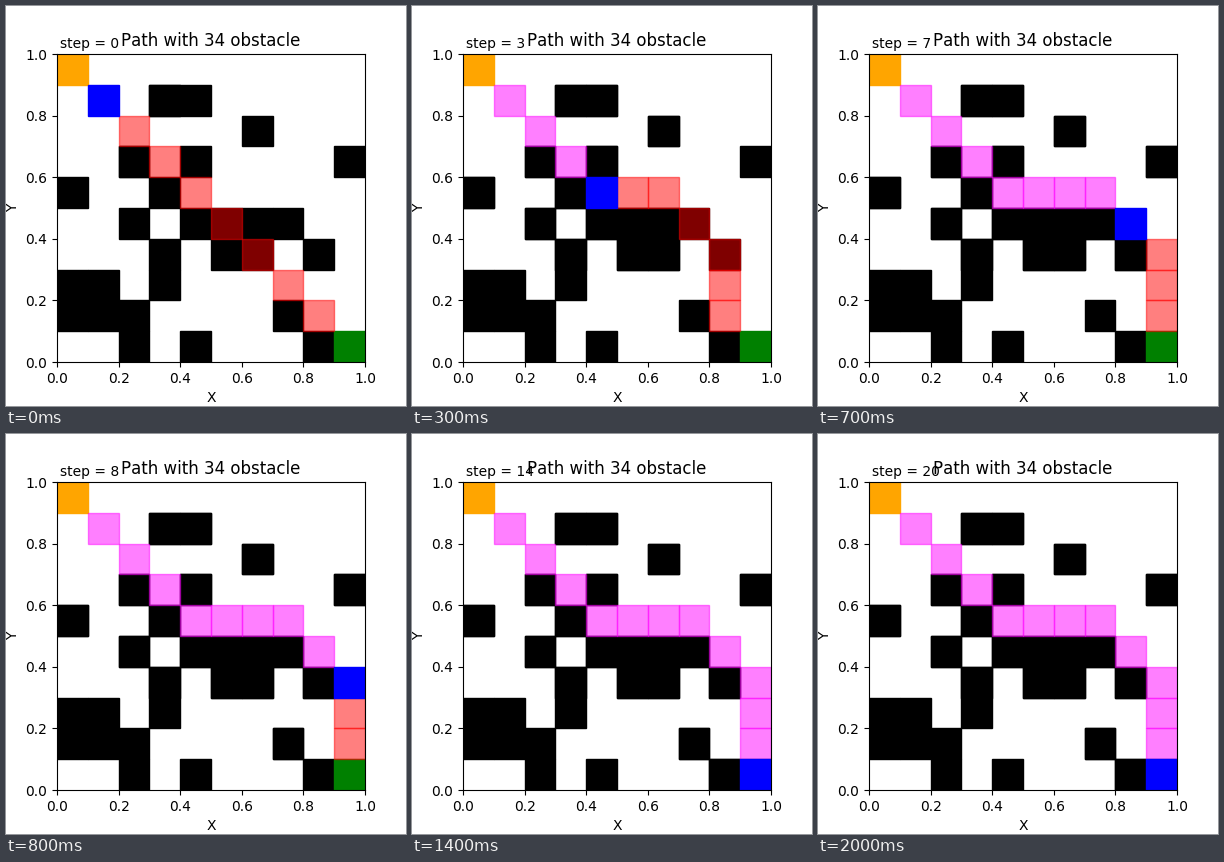
A matplotlib script that plays this animation: 400 by 400 pixels, repeating every 2.1 s.

```python
import math
from itertools import product

import matplotlib.pyplot as plt
from matplotlib.animation import FuncAnimation
from matplotlib.patches import Rectangle

STEPS = 21
N = 10
START, GOAL = (0, N - 1), (N - 1, 0)
SIGHT = 2            # how far the walker sees, in cells
CROWDING = 1e-3      # small extra cost per neighbouring obstacle

# Blocked columns of each row, from the bottom up
ROWS = "248 0127 013 3568 24567 03 249 6 34".split()
BLOCKED = [(int(col), row) for row, cols in enumerate(ROWS) for col in cols]
CELLS = list(product(range(N), repeat=2))
MOVES = [m for m in product((-1, 0, 1), repeat=2) if any(m)]


def around(cell):
    return [(cell[0] + dx, cell[1] + dy) for dx, dy in MOVES]


def plan(here, known):
    """Cheapest route from here to GOAL past the known obstacles."""
    crowd = {c: CROWDING * sum(n in known for n in around(c)) for c in CELLS}
    cost = {c: math.inf for c in CELLS if c not in known}
    cost[GOAL] = 0

    def via(cell, nxt):
        return math.dist(cell, nxt) + crowd[nxt] + cost[nxt]

    def exits(cell):
        return [n for n in around(cell) if n in cost]

    changed = True
    while changed:
        changed = False
        for cell in cost:
            best = min((via(cell, n) for n in exits(cell)), default=math.inf)
            if best < cost[cell] - 1e-9:
                cost[cell] = best
                changed = True

    route = [here]
    while route[-1] != GOAL:
        cell = route[-1]
        # Straight moves win ties
        route.append(min(exits(cell), key=lambda n: (round(via(cell, n), 6),
                                                     math.dist(cell, n))))
    return route[1:]


def explore():
    """Visited cells, known obstacles and route ahead for each step."""
    here, walked, known, states = (1, N - 2), [], set(), []
    for _ in range(STEPS):
        known |= {b for b in BLOCKED
                  if max(abs(b[0] - here[0]), abs(b[1] - here[1])) <= SIGHT}
        ahead = plan(here, known)
        states.append((here, list(walked), set(known), ahead[:-1]))
        if ahead:
            walked.append(here)
            here = ahead[0]
    return states


STATES = explore()

plt.rcParams["text.kerning_factor"] = 6
fig, ax = plt.subplots(figsize=(4, 4), dpi=100)
ax.set(xlim=(0, 1), ylim=(0, 1), aspect="equal", xlabel="X", ylabel="Y")
ax.set_title("Path with 34 obstacle")
label = ax.text(0.01, 1.02, "", transform=ax.transAxes)


def add_cell(cell, color, alpha=None):
    col, row = cell
    return ax.add_patch(Rectangle((col / N, row / N), 1 / N, 1 / N,
                                  color=color, alpha=alpha))


for cell in BLOCKED:
    add_cell(cell, "black")
add_cell(START, "orange")
add_cell(GOAL, "green")
moving = []


def update(step):
    while moving:
        moving.pop().remove()
    here, walked, known, ahead = STATES[step]
    moving.extend(add_cell(c, "black") for c in known)
    moving.extend(add_cell(c, "red", 0.5) for c in ahead)
    moving.extend(add_cell(c, "magenta", 0.5) for c in walked)
    moving.append(add_cell(here, "blue"))
    label.set_text(f"step = {step}")
    return [label, *moving]


anim = FuncAnimation(fig, update, frames=STEPS, interval=100,
                     init_func=lambda: update(0), repeat=True, repeat_delay=0)
plt.show()
```
